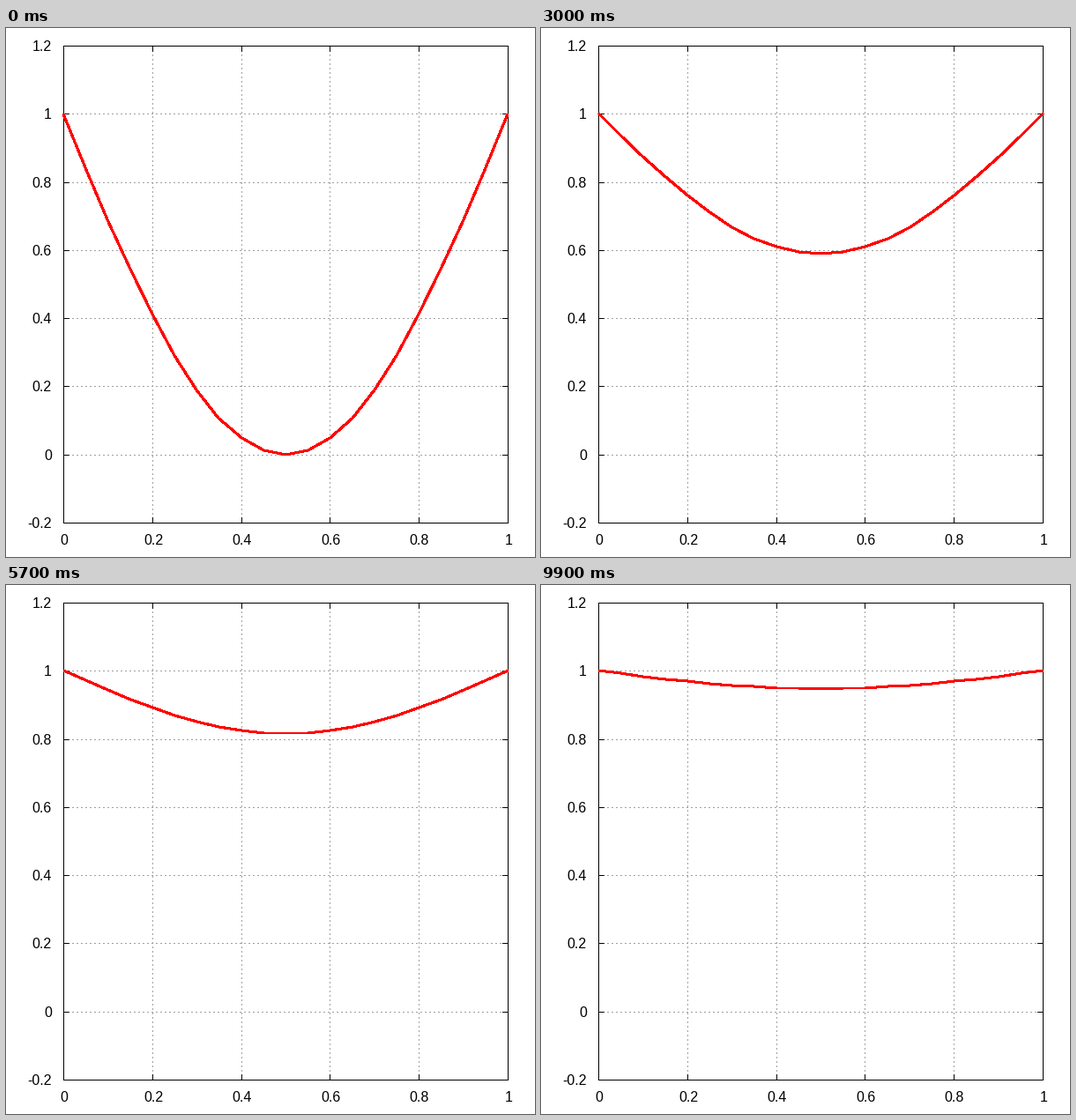
Recreate the animation shown at these times as a matplotlib script. Size 600 by 600 pixels, loop 10000 ms.

```python
import numpy as np
import matplotlib.pyplot as plt
from matplotlib.animation import FuncAnimation

SIZE, DPI = 600, 100
FRAMES, INTERVAL = 100, 100
LEFT, RIGHT, TOP, BOTTOM = 65, 569, 20, 561
PX = 72 / DPI          # one pixel in points
DECAY = 0.0297         # heat loss of the first sine mode per frame
TICK = 6

plt.rcParams["font.family"] = "Liberation Sans"


def to_px(x, y):
    """Data coordinates to whole stage pixels."""
    px = LEFT + (RIGHT - LEFT) * np.asarray(x)
    py = BOTTOM - (BOTTOM - TOP) * (np.asarray(y) + 0.2) / 1.4
    return np.rint(px), np.rint(py)


fig = plt.figure(figsize=(SIZE / DPI, SIZE / DPI), dpi=DPI, facecolor="white")
ax = fig.add_axes([0, 0, 1, 1])
ax.set_xlim(-0.5, SIZE - 0.5)
ax.set_ylim(SIZE - 0.5, -0.5)
ax.axis("off")


def stroke(xs, ys, color="black", width=1, **kw):
    line, = ax.plot(xs, ys, color=color, lw=width * PX, antialiased=False,
                    snap=False, solid_capstyle="butt", **kw)
    return line


def label(x, y, value, ha):
    ax.text(x, y, f"{value:.1f}".removesuffix(".0"), ha=ha, va="baseline",
            fontsize=16 * PX, color="black")


DOTS = dict(color="#a0a0a0", dashes=(2, 3), dash_capstyle="butt", zorder=1)

for i in range(6):
    x = to_px(i / 5, 0)[0]
    if 0 < i < 5:
        stroke([x, x], [BOTTOM + 0.5, TOP], **DOTS)
    stroke([x, x], [BOTTOM + 0.5, BOTTOM - TICK - 0.5])
    stroke([x, x], [TOP - 0.5, TOP + TICK + 0.5])
    label(x + 0.5, 585.5, i / 5, "center")

for i in range(-1, 7):
    y = to_px(0, i / 5)[1]
    if -1 < i < 6:
        stroke([LEFT - 0.5, RIGHT], [y, y], **DOTS)
    stroke([LEFT - 0.5, LEFT + TICK + 0.5], [y, y])
    stroke([RIGHT + 0.5, RIGHT - TICK - 0.5], [y, y])
    label(51.5, y + 5.5, i / 5, "right")

for x in (LEFT, RIGHT):
    stroke([x, x], [TOP - 0.5, BOTTOM + 0.5])
for y in (TOP, BOTTOM):
    stroke([LEFT - 0.5, RIGHT + 0.5], [y, y])

curve = stroke([], [], color="#ff0000", width=2, zorder=5)
grid = np.linspace(0, 1, 21)


def update(n):
    x, y = to_px(grid, 1 - np.exp(-DECAY * n) * np.sin(np.pi * grid))
    # a two-pixel pen covers the pixel and its neighbour to the left or above
    steep = np.abs(np.gradient(y, x)) > 1
    curve.set_data(x - 0.5 * steep, y - 0.5 * ~steep)
    return curve,


anim = FuncAnimation(fig, update, frames=FRAMES, interval=INTERVAL,
                     repeat=True, repeat_delay=0, blit=False)
plt.show()
```
